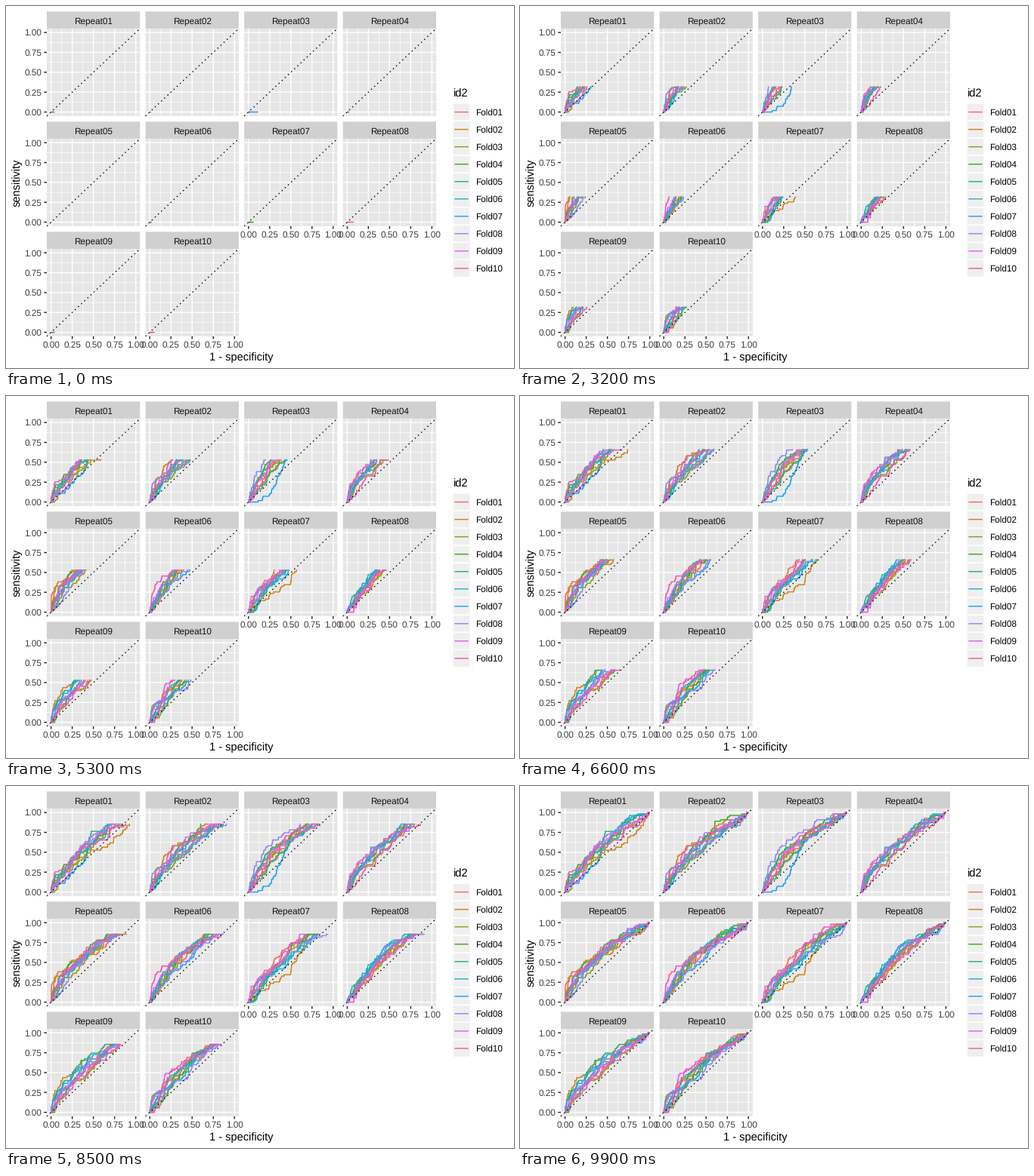
Recreate the animation shown at these times as a matplotlib script. Size 672x480 px, loop 10 s.

```python
import numpy as np
import matplotlib.pyplot as plt
from matplotlib.animation import FuncAnimation
from matplotlib.patches import Rectangle

W, H, DPI = 672, 480, 96
FRAMES, INTERVAL = 100, 100
PX = 72 / DPI  # points per pixel

plt.rcParams.update({
    "font.family": "Liberation Sans",
    "path.snap": False,
    "text.hinting": "none",
    "lines.solid_joinstyle": "round",
    "lines.solid_capstyle": "butt",
    "lines.dash_capstyle": "butt",
})

# Panel layout in pixels
LEFT, TOP = 54.0, 29.9
PANEL_W, PANEL_H = 123.25, 115.95
PITCH_X, PITCH_Y = 130.58, 146.05
STRIP_H = 22.6
STROKE = 1.42
SMALL, LARGE = 8.8, 11

COLORS = ["#f3695f", "#cc8312", "#929a10", "#3aa91f", "#22b26c",
          "#1fb3b8", "#18a3f0", "#8a84fb", "#df5eed", "#f455b0"]
BREAKS = np.linspace(0, 1, 5)
MINOR = BREAKS[:-1] + 0.125

# Curves that stray from the bundle: sideways shift and its sensitivity
STRAYS = {(1, 2): (0.26, 0.68), (1, 7): (0.16, 0.35), (3, 7): (0.22, 0.25),
          (3, 8): (-0.14, 0.6), (7, 2): (0.25, 0.4), (9, 2): (-0.13, 0.4)}
BLOCKS, BLOCK_STEPS = 5, 11
STEPS = BLOCKS * BLOCK_STEPS

rng = np.random.default_rng(12)

fig = plt.figure(figsize=(W / DPI, H / DPI), dpi=DPI, facecolor="white")
ax = fig.add_axes([0, 0, 1, 1])
ax.set(xlim=(0, W), ylim=(H, 0))
ax.axis("off")


def line(xs, ys, color, width=STROKE, z=2, **kw):
    return ax.plot(xs, ys, color=color, lw=width * PX, zorder=z, **kw)[0]


def rect(x, y, w, h, color, **kw):
    ax.add_patch(Rectangle((x, y), w, h, fc=color, zorder=1, **kw))


def text(x, y, s, size=SMALL, color="black", ha="center", **kw):
    ax.text(x, y, s, fontsize=size, color=color, ha=ha, va="baseline",
            zorder=6, **kw)


def to_px(col, row, x, y):
    px = LEFT + col * PITCH_X + PANEL_W * (np.asarray(x) + 0.05) / 1.1
    py = TOP + row * PITCH_Y + PANEL_H * (1.05 - np.asarray(y)) / 1.1
    return px, py


def draw_panel(i):
    row, col = divmod(i, 4)
    x, y = LEFT + col * PITCH_X, TOP + row * PITCH_Y
    right, bottom = x + PANEL_W, y + PANEL_H
    rect(x, y - STRIP_H, PANEL_W, STRIP_H, "#d0d0d0", lw=0)
    rect(x, y, PANEL_W, PANEL_H, "#e6e6e6", lw=0)
    text(x + PANEL_W / 2, y - 6.7, f"Repeat{i + 1:02d}", color="#121212")

    for ticks, width in ((MINOR, STROKE / 2), (BREAKS, STROKE)):
        for t in ticks:
            px, py = to_px(col, row, t, t)
            line([px, px], [y, bottom], "white", width)
            line([x, right], [py, py], "white", width)

    for t in BREAKS:
        px, py = to_px(col, row, t, t)
        if i >= 6:  # nothing below this panel
            line([px, px], [bottom, bottom + 3.67], "#262626")
            text(px, bottom + 15, f"{t:.2f}", color="#3f3f3f")
        if col == 0:
            line([x - 3.67, x], [py, py], "#262626")
            text(x - 6.6, py + 4.2, f"{t:.2f}", color="#3f3f3f", ha="right")

    dx, dy = to_px(col, row, [-0.05, 1.05], [-0.05, 1.05])
    line(dx, dy, "black", z=5, linestyle=(0, (1, 3)))


def draw_legend():
    text(591, 121, "id2", LARGE, ha="left")
    key = 23.04
    for k, color in enumerate(COLORS):
        mid = 140.6 + k * key
        rect(591, mid - key / 2, key, key, "#efefef", ec="white",
             lw=STROKE * PX)
        line([593.3, 611.7], [mid, mid], color)
        text(621.3, mid + 4.2, f"Fold{k + 1:02d}", ha="left")


def make_curve(repeat, fold):
    """Random staircase around a bowed curve x(y), given as (x, y)."""
    shift, centre = STRAYS.get((repeat, fold), (0, 0.5))
    noise = rng.normal(size=3) * (0.3 if shift else 1)
    bow, wave, ripple = noise * (0.05, 0.03, 0.02)

    y = np.linspace(0, 1, BLOCKS + 1)
    x = 0.98 * y - 0.64 * y * (1 - y)
    x += bow * np.sin(np.pi * y) + wave * np.sin(2 * np.pi * y)
    x += ripple * np.sin(3 * np.pi * y)
    x += shift * np.exp(-((y - centre) / 0.25) ** 2)
    knots = np.maximum.accumulate(np.clip(x, 0, 0.99))

    # Uneven treads that still meet the knots
    gaps = rng.gamma(0.55, size=(BLOCKS, BLOCK_STEPS)) + 0.02
    share = gaps.cumsum(axis=1) / gaps.sum(axis=1, keepdims=True)
    reach = knots[:-1, None] + np.diff(knots)[:, None] * share
    xs = np.r_[0, np.repeat(np.r_[reach.ravel(), 1], 2)[:-1]]
    return xs, np.repeat(np.linspace(0, 1, STEPS + 1), 2)


for i in range(10):
    draw_panel(i)
draw_legend()
text(311.5, 470, "1 - specificity", LARGE)
text(18, 234, "sensitivity", LARGE, rotation=90, rotation_mode="anchor")

curves = []
for i in range(10):
    row, col = divmod(i, 4)
    for k, color in enumerate(COLORS):
        x, y = make_curve(i + 1, k + 1)
        curves.append((line([], [], color, z=3 + k / 20), col, row, x, y))


def update(frame):
    """Reveal every curve up to the current sensitivity."""
    s = frame / (FRAMES - 1)
    for artist, col, row, x, y in curves:
        n = np.searchsorted(y, s + 1e-9, side="right")
        artist.set_data(*to_px(col, row, np.r_[x[:n], x[n - 1]],
                               np.r_[y[:n], s]))
    return [c[0] for c in curves]


anim = FuncAnimation(fig, update, frames=FRAMES, interval=INTERVAL,
                     repeat=True, repeat_delay=0, blit=False)
plt.show()
```
